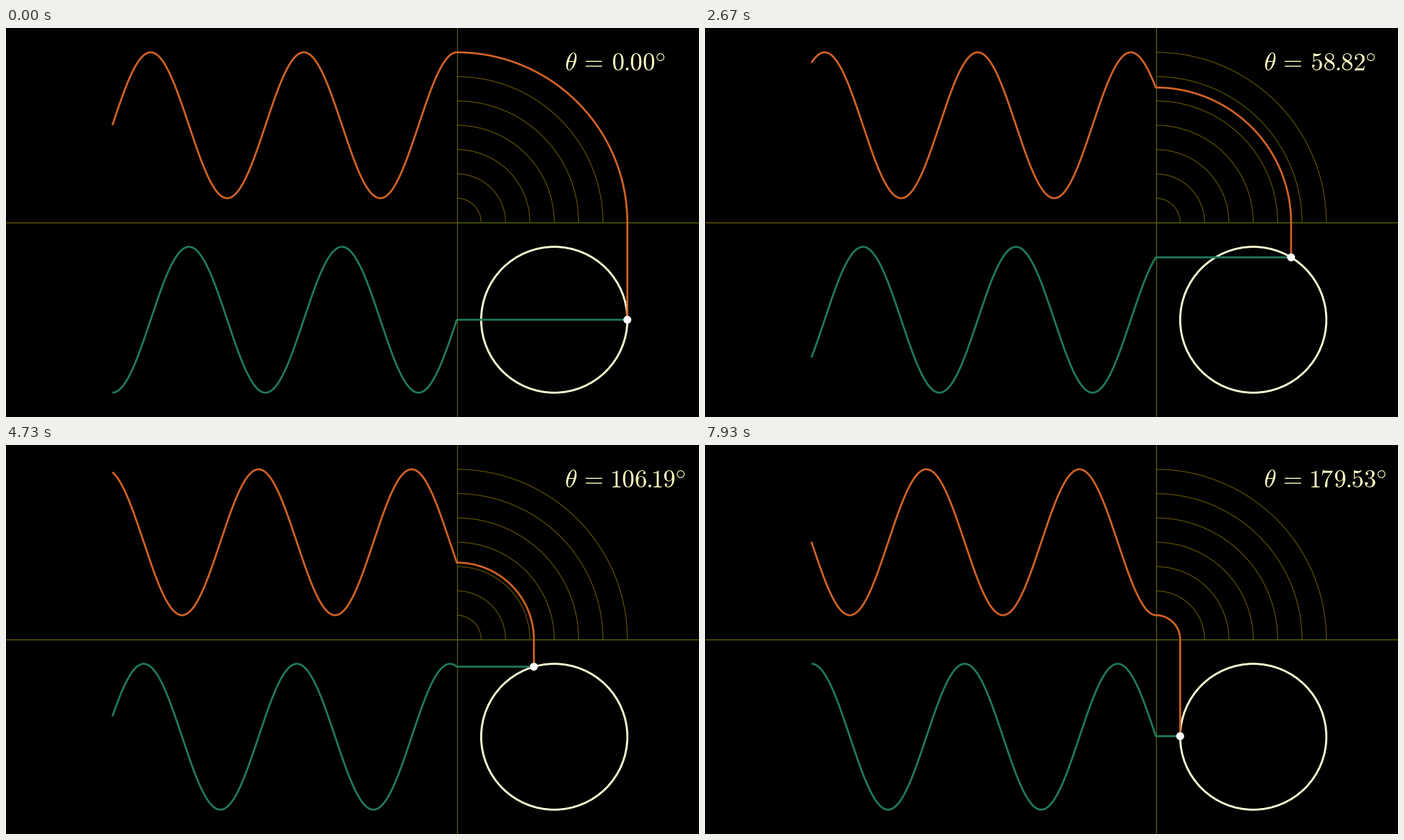
A matplotlib script for the animation above (8 s loop, 960 px wide and 540 px high).

```python
import numpy as np
import matplotlib.pyplot as plt
from matplotlib.animation import FuncAnimation
from matplotlib.patches import Arc, Circle, PathPatch
from matplotlib.path import Path
from matplotlib.textpath import TextPath

plt.rcParams["toolbar"] = "None"
plt.rcParams["mathtext.fontset"] = "cm"

W, H, DPI = 960, 540, 100
UNIT = 33.75            # pixels per plot unit
OX, OY = 624.5, 270     # axes crossing in pixels
PT = 72 / DPI           # points per pixel

LOOP, INTERVAL = 8000, 40
FPS = 15
STEP = 1 / 150          # radians per 1/60 s

ORANGE = "#cf6225"
GREEN = "#22795a"
CREAM = "#ffffd2"
TEXT = "#ffffc4"
DIM = "#5a5200"
FONT = 34.5
GAP = 3.2 / UNIT


def px(x, y):
    """Pixel position to plot units."""
    return (x - OX) / UNIT, (OY - y) / UNIT


def glyph(tex, size=FONT):
    """Outline of one symbol with its ink starting at (0, 0)."""
    path = TextPath((0, 0), f"${tex}$", size=size / UNIT)
    box = path.get_extents()
    return Path(path.vertices - [box.x0, box.y0], path.codes), box.width, box.height


def shift(path, x, y):
    return Path(path.vertices + [x, y], path.codes)


fig = plt.figure(figsize=(W / DPI, H / DPI), dpi=DPI, facecolor="black")
ax = fig.add_axes([0, 0, 1, 1])
ax.set_xlim(-OX / UNIT, (W - OX) / UNIT)
ax.set_ylim((OY - H) / UNIT, OY / UNIT)
ax.axis("off")

# Axes and quarter-circle guides
left, right = ax.get_xlim()
axis_style = dict(lw=1.3 * PT, solid_capstyle="butt")
ax.plot([left, 0], [0, 0], color="#665f08", **axis_style)
ax.plot([0, right], [0, 0], color="#566c08", **axis_style)
ax.plot([0, 0], [-8, 8], color="#5c5c10", **axis_style)
for r in range(1, 8):
    ax.add_patch(Arc((0, 0), 2 * r, 2 * r, theta1=0, theta2=90,
                     color=DIM, lw=1.2 * PT))

ax.add_patch(Circle((4, -4), 3, fill=False, ec=CREAM, lw=2.8 * PT, zorder=3))
line_style = dict(lw=2.7 * PT, solid_capstyle="butt", solid_joinstyle="round")
sine, = ax.plot([], [], color=GREEN, zorder=4, **line_style)
cosine, = ax.plot([], [], color=ORANGE, zorder=5, **line_style)
dot = ax.add_patch(Circle((7, -4), 5.5 / UNIT, color="white", lw=0, zorder=6))

# Angle label
NUM_X, NUM_Y = px(841, 58.8)
DIGITS = {c: glyph(c) for c in "0123456789."}
DEGREE = glyph(r"\circ", 28)
for tex, x, y in ((r"\theta", 776, 58.8), ("=", 803, 53.7)):
    ax.add_patch(PathPatch(shift(glyph(tex)[0], *px(x, y)), fc=TEXT, lw=0))
number = ax.add_patch(PathPatch(DIGITS["0"][0], fc=TEXT, lw=0))

dist = np.linspace(4.5 * np.pi, 0, 500)
quarter = np.linspace(np.pi / 2, 0, 80)


def number_path(value):
    text = f"{value:.2f}"
    x = NUM_X - (1 / UNIT if value >= 100 else 0)
    parts = []
    for c in text:
        path, width, _ = DIGITS[c]
        parts.append(shift(path, x, NUM_Y))
        x += width + GAP
    top = NUM_Y + DIGITS["0"][2]
    parts.append(shift(DEGREE[0], x, top - DEGREE[2]))
    return Path.make_compound_path(*parts)


def draw(i):
    n = int((i * INTERVAL + 30) * FPS / 1000)
    theta = max(0, 4 * n - 6) * STEP
    x, y = 4 + 3 * np.cos(theta), -4 + 3 * np.sin(theta)

    sine.set_data(np.append(-dist, x),
                  np.append(-4 + 3 * np.sin(theta - dist), y))
    cosine.set_data(
        np.concatenate([-dist, x * np.cos(quarter), [x]]),
        np.concatenate([4 + 3 * np.cos(theta - dist), x * np.sin(quarter), [y]]))
    dot.center = x, y
    number.set_path(number_path(np.degrees(theta)))
    return sine, cosine, dot, number


anim = FuncAnimation(fig, draw, frames=LOOP // INTERVAL, interval=INTERVAL,
                     repeat=True, repeat_delay=0, blit=False)
plt.show()
```
